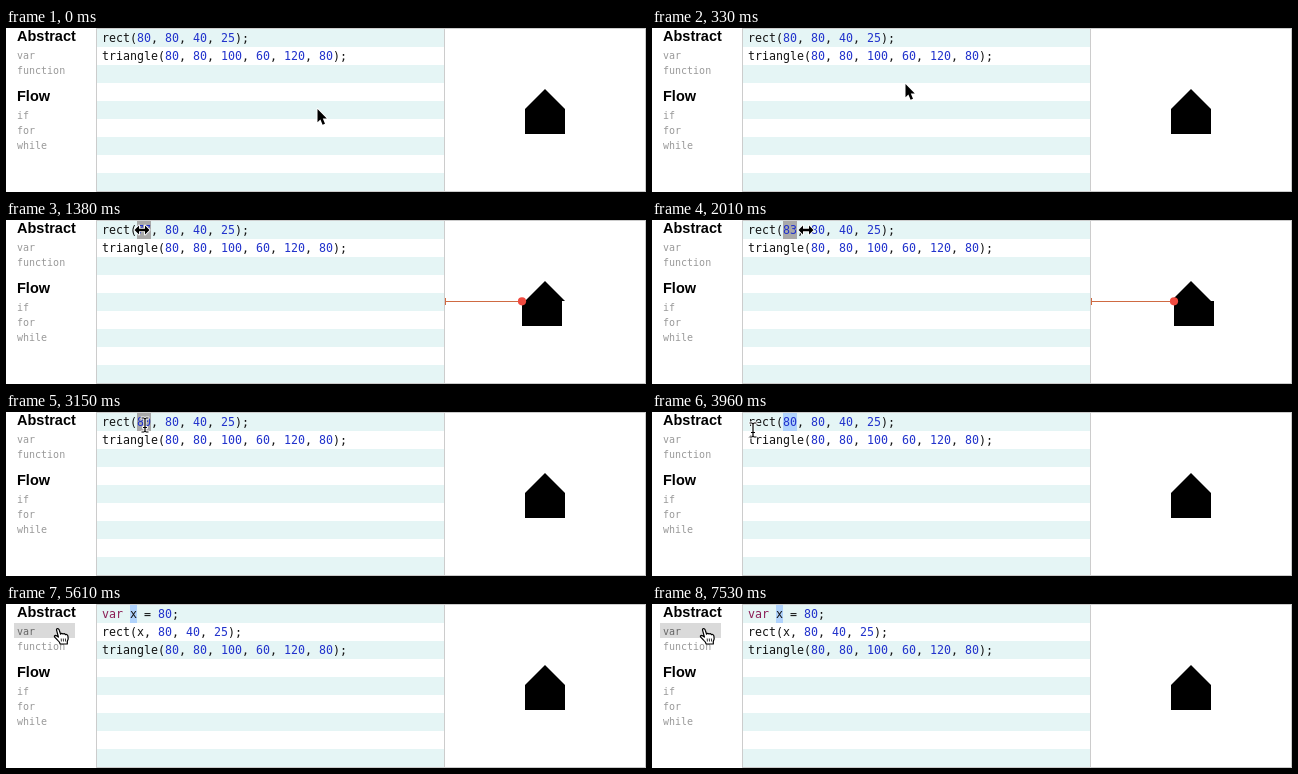
Animation, 640 px wide and 164 px high, one loop 8000 ms. Source, as an HTML page with a canvas:

```html
<!DOCTYPE html>
<html lang="en">
<head>
<meta charset="utf-8">
<title>Live code editor</title>
<style>
  html, body { margin: 0; width: 100%; height: 100%; overflow: hidden; background: #fff; }
  #stage { position: relative; width: 640px; height: 164px; overflow: hidden; }
  canvas { position: absolute; left: 0; top: 0; }
  #stage div { position: absolute; white-space: pre; }
  h2, .item { position: absolute; left: 11px; margin: 0; }
  h2 { font: bold 14.5px/18px "Liberation Sans", Arial, sans-serif; color: #000; }
  .item { font: 10px/15px "DejaVu Sans Mono", monospace; color: #999; }
  .item.hot { color: #666; }
  .line { left: 96px; font: 11.63px/18px "DejaVu Sans Mono", monospace; color: #111; }
  .num { color: #2233cc; }
  .key { color: #8b1c55; }
</style>
</head>
<body>
<div id="stage">
  <canvas id="back" width="640" height="164"></canvas>
  <h2 style="top:-1px">Abstract</h2>
  <div class="item" id="var" style="top:20px">var</div>
  <div class="item" style="top:35px">function</div>
  <h2 style="top:59px">Flow</h2>
  <div class="item" style="top:80px">if</div>
  <div class="item" style="top:95px">for</div>
  <div class="item" style="top:110px">while</div>
  <div class="line" style="top:1px"></div>
  <div class="line" style="top:19px"></div>
  <div class="line" style="top:37px"></div>
  <canvas id="front" width="640" height="164"></canvas>
</div>
<script>
const LOOP = 8000, STEP = 30;
const back = document.getElementById('back').getContext('2d');
const front = document.getElementById('front').getContext('2d');
const varItem = document.getElementById('var');
const lines = [...document.querySelectorAll('.line')];

const T = { drag: 840, release: 2250, beam: 3150, select: 3330, leave: 3630, press: 5400, insert: 5580 };
const valueKeys = [[840, 80], [1140, 95], [1485, 72], [1590, 84], [1920, 84], [2250, 80]];
const xKeys = [[30, 311], [780, 145], [840, 145], [1140, 190], [1485, 121], [1590, 157],
  [1920, 157], [2250, 140], [3120, 140], [3150, 139], [3630, 139], [4350, 52]];
const yKeys = [[30, 81], [780, 10], [1920, 10], [2250, 11], [3120, 11], [3150, 13], [3630, 13], [4350, 25]];

function track(keys, t) {
  if (t <= keys[0][0]) return keys[0][1];
  for (let i = 1; i < keys.length; i++) {
    const [t0, a] = keys[i - 1], [t1, b] = keys[i];
    if (t < t1) {
      const p = (t - t0) / (t1 - t0);
      return a + (b - a) * p * p * (3 - 2 * p);
    }
  }
  return keys[keys.length - 1][1];
}

function box(color, x, y, w, h) {
  back.fillStyle = color;
  back.fillRect(x, y, w, h);
}

function markup(code) {
  return code.replace(/\bvar\b|\d+/g, s => `<span class="${s === 'var' ? 'key' : 'num'}">${s}</span>`);
}

function setCode(code) {
  lines.forEach((el, i) => {
    const text = code[i] || '';
    if (el.dataset.code === text) return;
    el.dataset.code = text;
    el.innerHTML = markup(text);
  });
}

const cursors = {
  arrow: {
    fill: '#000', edge: '#fff',
    path: new Path2D('M.5 0V13.2L3.4 10.5L5.6 15.7L8 14.7L5.8 9.6H9.8Z')
  },
  resize: {
    fill: '#000', edge: '#fff',
    path: new Path2D('M-7.5 0L-3 -4.5V-1.2H3V-4.5L7.5 0L3 4.5V1.2H-3V4.5Z')
  },
  beam: {
    fill: '#000', edge: '#fff',
    path: new Path2D('M-3.5 -7.5H-1L0 -6.7L1 -7.5H3.5V-6.5H1.3L.6 -5.8V2H2V3H.6V5.8L1.3 6.5H3.5V7.5H1L0 6.7L-1 7.5H-3.5V6.5H-1.3L-.6 5.8V3H-2V2H-.6V-5.8L-1.3 -6.5H-3.5Z')
  },
  hand: {
    fill: '#fff', edge: '#000',
    path: new Path2D('M-1.5 .8Q-1.3 -.8 .2 -.3Q1 .1 1.3 1.2L2.6 5.2Q3.3 3.8 5 5Q6.4 4 7.4 5.6Q9.4 5 9.9 7Q10.7 10 9.3 12.4V15H2.2Q1.6 12.8 -.2 11.4L-3.3 8.2Q-4.2 6.7 -2.6 6.3Q-1.2 6.3 .4 8Z')
  }
};

function drawCursor(name, x, y) {
  const c = cursors[name];
  front.save();
  front.translate(x, y);
  front.lineJoin = 'round';
  front.lineWidth = name === 'hand' ? 1.2 : 1.8;
  front.strokeStyle = c.edge;
  front.fillStyle = c.fill;
  if (name === 'hand') {
    front.fill(c.path);
    front.stroke(c.path);
    front.lineWidth = 0.8;
    front.beginPath();
    for (const dx of [3.2, 5.3, 7.4]) {
      front.moveTo(dx, 9.5);
      front.lineTo(dx + 0.2, 12.5);
    }
    front.stroke();
  } else {
    front.stroke(c.path);
    front.fill(c.path);
  }
  front.restore();
}

function drawHouse(value) {
  box('#000', 439 + value, 81, 40, 25);
  back.beginPath();
  back.moveTo(519, 81);
  back.lineTo(539, 61);
  back.lineTo(559, 81);
  back.fill();
}

function drawGuide(value) {
  box('#cf6a42', 439, 81, value, 1);
  box('#cf6a42', 439, 78, 1, 7);
  back.fillStyle = '#f04b40';
  back.beginPath();
  back.arc(439 + value, 81.3, 4.1, 0, 7);
  back.fill();
}

function cursorAt(t, x, y, onNumber, onVar) {
  if (onVar) return 'hand';
  if (t < T.beam && onNumber) return 'resize';
  return x > 90 && x < 341 && y < 37 ? 'beam' : 'arrow';
}

function draw(t) {
  const x = track(xKeys, t), y = track(yKeys, t);
  const value = Math.round(track(valueKeys, t));
  const dragging = t >= T.drag && t < T.release;
  const over = x >= 131 && x <= 147 && y < 19;
  const onNumber = dragging || (t < T.beam && over);
  const onVar = t > T.leave && x < 69 && y >= 19;
  const inserted = t >= T.insert;

  box('#fff', 0, 0, 640, 164);
  for (let row = 0; row < 9; row += 2) box('#e5f5f5', 91, 1 + row * 18, 347, 18);
  box('#ccc', 90, 0, 550, 1);
  box('#ccc', 90, 163, 550, 1);
  for (const edge of [90, 438, 639]) box('#ccc', edge, 0, 1, 164);

  if (onVar) box(t >= T.press && !inserted ? '#cacaca' : '#dadada', 8, 19, 61, 15);
  varItem.classList.toggle('hot', onVar);

  if (inserted) box('#b0d3fc', 124, 1, 7, 18);
  else if (t >= T.select) box('#b0d3fc', 131, 1, 14, 18);
  else if (onNumber || t >= T.drag) box('#a9a9a9', 131, 1, 14, 18);

  drawHouse(value);
  if (dragging || (over && t < T.drag) || (over && t > T.leave)) drawGuide(value);

  const roof = 'triangle(80, 80, 100, 60, 120, 80);';
  setCode(inserted
    ? ['var x = 80;', 'rect(x, 80, 40, 25);', roof]
    : [`rect(${value}, 80, 40, 25);`, roof]);

  front.clearRect(0, 0, 640, 164);
  drawCursor(cursorAt(t, x, y, onNumber, onVar), Math.round(x), Math.round(y));
}

const start = performance.now();
function tick() {
  const t = (performance.now() - start) % LOOP;
  draw(Math.floor(t / STEP) * STEP);
  requestAnimationFrame(tick);
}
tick();
</script>
</body>
</html>
```
